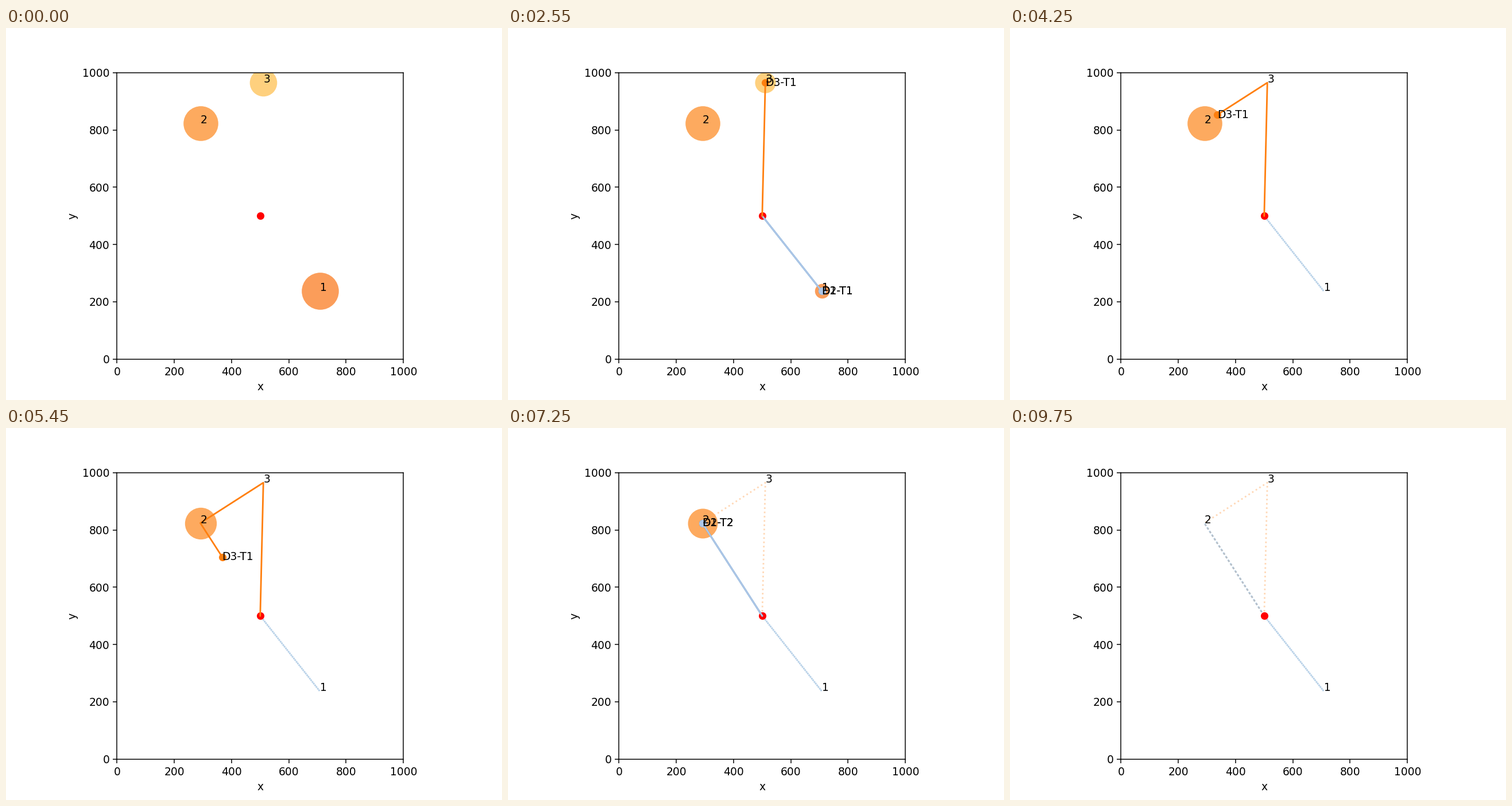
Recreate the animation shown at these times as a matplotlib script. Size 864x648 px, loop 10 s.

```python
import numpy as np
import matplotlib.pyplot as plt
from matplotlib.animation import FuncAnimation

DPI = 135
FRAMES = 200        # 50 ms each
LAST = 195          # the picture rests from here on
SPEED = 12.366      # data units per frame

DEPOT = (500, 500)
N1, N2, N3 = (708, 237), (291, 824), (511, 965)
BLUE, PALE, ORANGE = "#1f77b4", "#aec7e8", "#ff7f0e"


def trip(start, stops):
    """Times and points of a round trip; stops are (node, unloading time)."""
    times, points = [start], [DEPOT]
    for node, wait in stops + [(DEPOT, 0)]:
        arrive = times[-1] + np.hypot(*np.subtract(node, points[-1])) / SPEED
        times.append(arrive)
        points.append(node)
        if wait:
            times.append(arrive + wait)
            points.append(node)
    return np.array(times), np.array(points, float)


class Vehicle:
    def __init__(self, ax, name, color, start, stops):
        self.times, self.points = trip(start, stops)
        self.trail, = ax.plot([], [], color=color)
        self.dot, = ax.plot([], [], "o", color=color)
        self.label = ax.text(*DEPOT, name, va="center")
        route = self.points[np.r_[True, np.any(np.diff(self.points, axis=0), axis=1)]]
        self.done, = ax.plot(*route.T, ":", color=color, alpha=0.3, zorder=0.5)

    def update(self, t):
        active = self.times[0] < t < self.times[-1]
        for part in (self.trail, self.dot, self.label):
            part.set_visible(active)
        self.done.set_visible(t >= self.times[-1])
        if active:
            pos = [np.interp(t, self.times, c) for c in self.points.T]
            path = np.vstack([self.points[self.times < t], pos])
            self.trail.set_data(*path.T)
            self.dot.set_data([pos[0]], [pos[1]])
            self.label.set_position(pos)


class Customer:
    def __init__(self, ax, name, node, color, size, times, left):
        self.size, self.times, self.left = size, times, left
        self.disc = ax.scatter(*node, s=size, color=color, zorder=1)
        ax.text(*node, name)

    def update(self, t):
        left = np.interp(t, self.times, self.left)
        self.disc.set_sizes([self.size * left])
        self.disc.set_visible(left > 0)


fig, ax = plt.subplots(figsize=(864 / DPI, 648 / DPI), dpi=DPI)
ax.set(xlim=(0, 1000), ylim=(0, 1000), xlabel="x", ylabel="y", aspect="equal")
ax.plot(*DEPOT, "ro")

first, second = [(N1, 27.85)], [(N2, 20.5)]
vehicles = [
    Vehicle(ax, "D1-T1", BLUE, 0, first),
    Vehicle(ax, "D2-T1", PALE, 0, first),
    Vehicle(ax, "D3-T1", ORANGE, 0, [(N3, 30.57), (N2, 8.3)]),
    Vehicle(ax, "D1-T2", BLUE, 111.27, second),
    Vehicle(ax, "D2-T2", PALE, 111.27, second),
]

t1, t3, t2 = vehicles[0].times, vehicles[2].times, vehicles[3].times
customers = [
    Customer(ax, "1", N1, "#fb9d5a", 1118, t1[1:3], [1, 0]),
    Customer(ax, "2", N2, "#fdaa5f", 980, [*t3[3:5], *t2[1:3]], [1, 0.83, 0.83, 0]),
    Customer(ax, "3", N3, "#fed07e", 594, t3[1:3], [1, 0]),
]


def update(frame):
    t = min(frame, LAST)
    for item in vehicles + customers:
        item.update(t)
    return []


anim = FuncAnimation(fig, update, frames=FRAMES, interval=50,
                     repeat=True, repeat_delay=0, blit=False)
plt.show()
```
